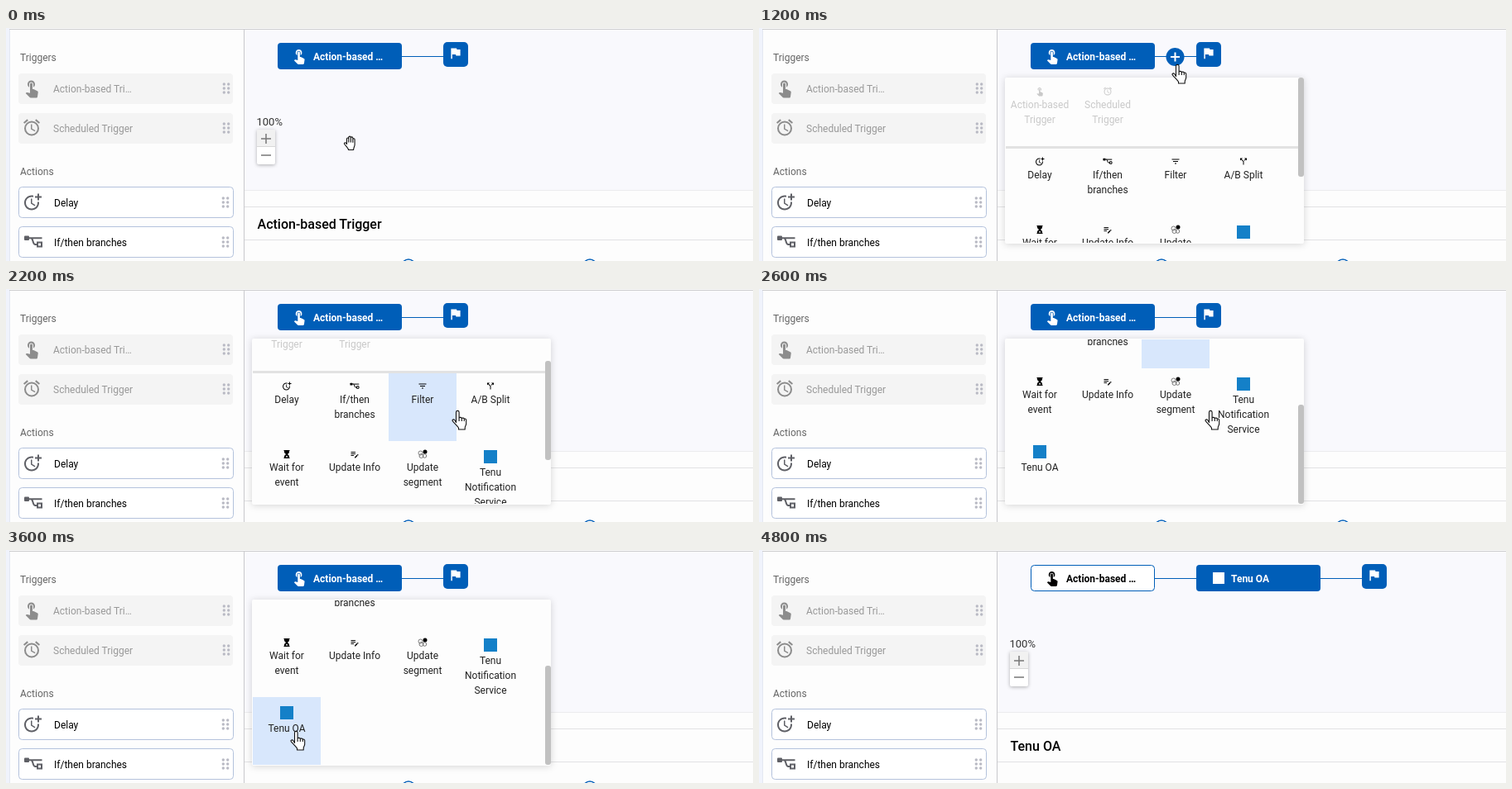
An HTML page that plays this animation: 902 px wide and 282 px high, repeating every 5400 ms.

```html
<!DOCTYPE html>
<html lang="en">
<head>
<meta charset="utf-8">
<title>Workflow builder</title>
<style>
  html, body { margin: 0; width: 100%; height: 100%; overflow: hidden; background: #fdfdfd; }
  svg { display: block; }
  text { font: 12px Roboto, Arial, sans-serif; }
  .head { fill: #666; }
  .off text { fill: #999; }
  .off .icon { fill: #8c8c8c; color: #8c8c8c; }
  .off rect { fill: #f4f4f4; }
  .on rect { fill: #fff; stroke: #b4c2dc; }
  .on .icon { fill: #5f6066; color: #5f6066; }
  .title { font-size: 16px; font-weight: 500; }
  .node { font-weight: 700; }
  .blue { fill: #005eb8; }
  .white { fill: #fff; }
  .rule { stroke: #e2e2e4; }
  .link { stroke: #005eb8; }
  .logo { fill: #1480c8; }
  .menu text { text-anchor: middle; fill: #222; }
  .menu .dim, .menu .dim text { fill: #c9c9c9; }
  .hover { fill: #d8e7fc; }
  .panel { filter: drop-shadow(0 1px 4px rgba(0, 0, 0, .16)); }
  .zoom { filter: drop-shadow(0 1px 2px rgba(0, 0, 0, .3)); }
  .cursor path { fill: #fff; stroke: #111; stroke-width: 1.1; stroke-linejoin: round; }

  .before, .after, .menu, .plus, .hover, .cursor, .cursor > g, .scroll, .thumb {
    animation: 5.4s step-end infinite;
  }
  .before { animation-name: before; }
  .after { animation-name: after; }
  .menu { animation-name: menu; }
  .plus { animation-name: plus; }
  .filter { animation-name: filter; }
  .account { animation-name: account; }
  .scroll { animation-name: scroll; }
  .thumb { animation-name: thumb; }
  .cursor { animation-name: move; }
  .cursor > .grab { animation-name: grab; }
  .cursor > .point { animation-name: point; }
  .cursor > .arrow { animation-name: arrow; }

  @keyframes before { 0% { visibility: visible } 70.3%, 100% { visibility: hidden } }
  @keyframes after { 0% { visibility: hidden } 70.3%, 100% { visibility: visible } }
  @keyframes menu { 0%, 70.3%, 100% { display: none; opacity: 0 } 22.2% { display: inline; opacity: 1 } }
  @keyframes plus { 0%, 29.6%, 100% { visibility: hidden } 7.4% { visibility: visible } }
  @keyframes filter { 0%, 51.8%, 100% { opacity: 0 } 29.6% { opacity: 1 } }
  @keyframes account { 0%, 70.3%, 100% { opacity: 0 } 59.2% { opacity: 1 } }
  @keyframes scroll {
    0% { transform: translateY(0) }
    40.7% { transform: translateY(-44px) }
    44.4% { transform: translateY(-100px) }
    48.1%, 100% { transform: translateY(-132px) }
  }
  @keyframes thumb {
    0% { transform: translateY(0) }
    40.7% { transform: translateY(27px) }
    44.4% { transform: translateY(61px) }
    48.1%, 100% { transform: translateY(80px) }
  }
  @keyframes move {
    0% { transform: translate(407px, 130px) }
    3.7% { transform: translate(464px, 78px) }
    7.4% { transform: translate(508px, 45px) }
    11.1% { transform: translate(505px, 44px) }
    29.6% { transform: translate(528px, 196px) }
    33.3% { transform: translate(538px, 170px) }
    37% { transform: translate(545px, 147px) }
    51.8% { transform: translate(466px, 188px) }
    55.5% { transform: translate(398px, 205px) }
    59.2% { transform: translate(358px, 216px) }
    62.9% { transform: translate(350px, 219px) }
    70.3%, 100% { transform: translate(350px, 219px) }
  }
  @keyframes grab { 0% { visibility: visible } 7.4%, 100% { visibility: hidden } }
  @keyframes point { 0%, 51.8%, 70.3%, 100% { visibility: hidden } 7.4%, 59.2% { visibility: visible } }
  @keyframes arrow { 0%, 59.2%, 74%, 100% { visibility: hidden } 51.8%, 70.3% { visibility: visible } }
</style>
</head>
<body>
<svg width="902" height="282" viewBox="0 0 902 282">
  <defs>
    <path id="touch" d="M9 11.24V7.5a2.5 2.5 0 015 0v3.74c1.21-.81 2-2.18 2-3.74C16 5.01 13.99 3 11.5 3S7 5.01 7 7.5c0 1.56.79 2.93 2 3.74zm9.84 4.63l-4.54-2.26c-.17-.07-.35-.11-.54-.11H13v-6c0-.83-.67-1.5-1.5-1.5S10 6.67 10 7.5v10.74c-3.6-.76-3.54-.75-3.67-.75-.31 0-.59.13-.79.33l-.79.8 4.94 4.94c.27.27.65.44 1.06.44h6.79c.75 0 1.33-.55 1.44-1.28l.75-5.27c.01-.07.02-.14.02-.2 0-.62-.38-1.16-.91-1.38z"/>
    <path id="alarm" d="M22 5.72l-4.6-3.86-1.29 1.53 4.6 3.86zM7.88 3.39L6.6 1.86 2 5.71l1.29 1.53zM12.5 8H11v6l4.75 2.85.75-1.23-4-2.37zM12 4a9 9 0 100 18 9 9 0 000-18zm0 16a7 7 0 110-14 7 7 0 010 14z"/>
    <path id="delay" d="M10 8v6l4.7 2.9.8-1.2-4-2.4V8zM17.92 12c.05.33.08.66.08 1 0 3.9-3.1 7-7 7s-7-3.1-7-7 3.1-7 7-7c.7 0 1.37.1 2 .29V4.23C12.36 4.08 11.69 4 11 4c-5 0-9 4-9 9s4 9 9 9 9-4 9-9c0-.34-.02-.67-.06-1zM20 5V2h-2v3h-3v2h3v3h2V7h3V5z"/>
    <g id="branch">
      <rect x="1" y="4.500" width="6" height="5.500" rx="1"/>
      <path d="M7 7.200H22.500M9 7.200c3 0 2 7.800 5 7.800h3M17 12.500h5v5h-5z" fill="none" stroke="currentColor" stroke-width="2"/>
    </g>
    <path id="lines" d="M10 18h4v-2h-4zM3 6v2h18V6zM6 13h12v-2H6z"/>
    <path id="split" d="M14 4l2.29 2.29-2.88 2.88 1.42 1.42 2.88-2.88L20 10V4zM10 4H4v6l2.290-2.290 4.710 4.700V20h2v-8.410l-5.290-5.300z"/>
    <path id="glass" d="M5 2v2h1v4l4 4-4 4v4H5v2h14v-2h-1v-4l-4-4 4-4V4h1V2zM9 19l3-4 3 4z"/>
    <path id="note" d="M3 10h11v2H3zM3 6h11v2H3zM3 14h7v2H3zM18 12.900l.7-.7a1 1 0 011.400 0l.7.7a1 1 0 010 1.400l-.7.7zM17.300 13.600l-5.300 5.300V21h2.100l5.300-5.300z"/>
    <g id="segment">
      <g fill="none" stroke="#777" stroke-width="2">
        <circle cx="7" cy="9" r="5"/><circle cx="9" cy="16" r="5"/><circle cx="17" cy="16" r="4.500"/>
      </g>
      <circle cx="18" cy="6" r="5"/>
    </g>
    <path id="flag" d="M14.400 6L14 4H5v17h2v-7h5.600l.4 2h7V6z"/>
    <g id="grip" fill="#b9bac4">
      <circle cx="-2.700" cy="-5" r="1.700"/><circle cx="2.700" cy="-5" r="1.700"/>
      <circle cx="-2.700" r="1.700"/><circle cx="2.700" r="1.700"/>
      <circle cx="-2.700" cy="5" r="1.700"/><circle cx="2.700" cy="5" r="1.700"/>
    </g>
    <g id="end">
      <rect class="blue" y="17" width="30" height="30" rx="5"/>
      <use href="#flag" class="white" transform="translate(5.600 21.600) scale(.75)"/>
    </g>
    <clipPath id="view"><rect x="298" y="61" width="353" height="199"/></clipPath>
  </defs>

  <!-- page -->
  <rect width="902" height="282" fill="#fdfdfd"/>
  <rect width="4" height="282" fill="#f0f3fc"/>
  <path d="M4.500 2V282" stroke="#e4e8f2"/>
  <rect x="288" y="2" width="614" height="194" fill="#f9f9fd"/>
  <path d="M288 196.500H902" stroke="#ececee"/>
  <path class="rule" d="M288 216.500H902M288 256.500H902"/>
  <path d="M287.500 2V282" stroke="#c9c9cc"/>
  <path d="M4 1.500H902" stroke="#cbcbcd"/>

  <!-- sidebar -->
  <text class="head" x="17" y="40">Triggers</text>
  <g class="off">
    <rect x="15" y="55" width="259" height="37" rx="4"/>
    <use href="#touch" class="icon" x="19" y="60.500"/>
    <text x="57" y="78">Action-based Tri…</text>
    <use href="#grip" x="266" y="73"/>
    <rect x="15" y="103" width="259" height="37" rx="4"/>
    <use href="#alarm" class="icon" x="19" y="108.500"/>
    <text x="57" y="126">Scheduled Trigger</text>
    <use href="#grip" x="266" y="121"/>
  </g>
  <text class="head" x="17" y="178">Actions</text>
  <g class="on">
    <rect x="15.500" y="192.500" width="259" height="37" rx="4"/>
    <use href="#delay" class="icon" x="20" y="198.500"/>
    <text x="58" y="216">Delay</text>
    <use href="#grip" x="265" y="211"/>
    <rect x="15.500" y="240.500" width="259" height="37" rx="4"/>
    <use href="#branch" class="icon" x="21" y="247"/>
    <text x="58" y="264">If/then branches</text>
    <use href="#grip" x="265" y="259"/>
  </g>

  <!-- zoom -->
  <text x="302.500" y="118" style="font-size:13px" fill="#333">100%</text>
  <g class="zoom">
    <rect x="303" y="123" width="22" height="42" rx="2" fill="#fff"/>
    <path d="M303 123h22v20h-22z" fill="#f1f1f1"/>
  </g>
  <path d="M303 143.500h22" stroke="#d8d8d8"/>
  <path d="M308 134h12M314 128v12M308 154h12" stroke="#777" stroke-width="1.500"/>

  <!-- flow -->
  <g class="before">
    <path class="link" d="M478 34.500h50"/>
    <rect class="blue" x="328" y="18" width="150" height="32" rx="4"/>
    <use href="#touch" class="white" transform="translate(343.800 23.500) scale(.85)"/>
    <text class="node white" x="371" y="39">Action-based …</text>
    <use href="#end" x="528"/>
    <text class="title" x="303.500" y="243">Action-based Trigger</text>
    <g fill="#fff" stroke="#005eb8" stroke-width="1.500">
      <circle cx="486" cy="288" r="8"/><circle cx="705" cy="288" r="8"/>
    </g>
  </g>
  <g class="plus">
    <circle class="blue" cx="502.500" cy="35" r="11"/>
    <path d="M497 35h11M502.500 29.500v11" stroke="#fff" stroke-width="2"/>
  </g>
  <g class="after">
    <path class="link" d="M478 34.500h50M678 34.500h50"/>
    <rect x="328.500" y="18.500" width="149" height="31" rx="4" fill="#fff" stroke="#005eb8"/>
    <use href="#touch" transform="translate(343.800 23.500) scale(.85)"/>
    <text class="node" x="371" y="39">Action-based …</text>
    <rect class="blue" x="528" y="18" width="150" height="32" rx="4"/>
    <rect class="white" x="548" y="27" width="14" height="14"/>
    <text class="node white" x="570" y="39">Tenu OA</text>
    <use href="#end" x="728"/>
    <text class="title" x="303.500" y="243">Tenu OA</text>
  </g>

  <!-- action menu -->
  <g class="menu">
    <rect class="panel" x="297" y="60" width="361" height="201" rx="2" fill="#fdfdfd"/>
    <g clip-path="url(#view)">
      <g class="scroll">
        <rect class="hover filter" x="462" y="146" width="82" height="82"/>
        <rect class="hover account" x="298" y="310" width="82" height="82"/>
        <g class="dim">
          <use href="#touch" transform="translate(333 70.500) scale(.5)"/>
          <text x="339" y="97">Action-based</text><text x="339" y="115">Trigger</text>
          <use href="#alarm" transform="translate(415 70.500) scale(.5)"/>
          <text x="421" y="97">Scheduled</text><text x="421" y="115">Trigger</text>
        </g>
        <path d="M298 144.500H651" stroke="#e2e2e2" stroke-width="3"/>
        <use href="#delay" transform="translate(333 155.500) scale(.5)"/>
        <text x="339" y="182">Delay</text>
        <use href="#branch" transform="translate(415 155.500) scale(.5)"/>
        <text x="421" y="182">If/then</text><text x="421" y="200">branches</text>
        <use href="#lines" transform="translate(497 155.500) scale(.5)"/>
        <text x="503" y="182">Filter</text>
        <use href="#split" transform="translate(579 155.500) scale(.5)"/>
        <text x="585" y="182">A/B Split</text>
        <use href="#glass" transform="translate(333 238) scale(.5)"/>
        <text x="339" y="264">Wait for</text><text x="339" y="282">event</text>
        <use href="#note" transform="translate(415 238) scale(.5)"/>
        <text x="421" y="264">Update Info</text>
        <use href="#segment" transform="translate(497 238) scale(.5)"/>
        <text x="503" y="264">Update</text><text x="503" y="282">segment</text>
        <rect class="logo" x="577" y="239" width="16" height="16"/>
        <text x="585" y="270">Tenu</text><text x="585" y="288">Notification</text><text x="585" y="306">Service</text>
        <rect class="logo" x="331" y="321" width="16" height="16"/>
        <text x="339" y="352">Tenu OA</text>
      </g>
    </g>
    <rect class="thumb" x="651" y="60" width="7" height="120" rx="3" fill="#c1c1c1"/>
  </g>

  <!-- pointer -->
  <g class="cursor">
    <g class="grab">
      <path d="M4.500 10.500V4.200c0-1.600 2.200-1.600 2.300 0V2.400c0-1.700 2.400-1.700 2.500 0V3c.1-1.500 2.400-1.500 2.500.2v1.600c.2-1.400 2.300-1.300 2.300.3v6c0 2.500-1.500 3.500-1.500 6.400H6.500c0-2-2.500-3.800-4.800-7-.9-1.400.9-2.400 2-1.200zM6.800 4v4.500M9.300 3v5.500M11.800 4.800v4"/>
    </g>
    <g class="point">
      <path transform="translate(-7)" d="M5.500 14.500V2.200a1.800 1.800 0 013.600 0V9c.6-1 3-.8 3.200.6.6-.9 2.800-.6 3 .8.8-.8 2.400-.2 2.400 1.200V16c0 2-1.500 3-1.500 5v2H8.500v-2C7 19 4 16 1.500 13.200c-1.200-1.600.6-3 2-1.900zM9.100 9v4M12.300 9.600V13M15.300 10.400V13"/>
    </g>
    <g class="arrow">
      <path d="M.5.5v16l3.700-3.600 2.600 6 2.500-1-2.600-5.900h5.100z"/>
    </g>
  </g>
</svg>
</body>
</html>
```
